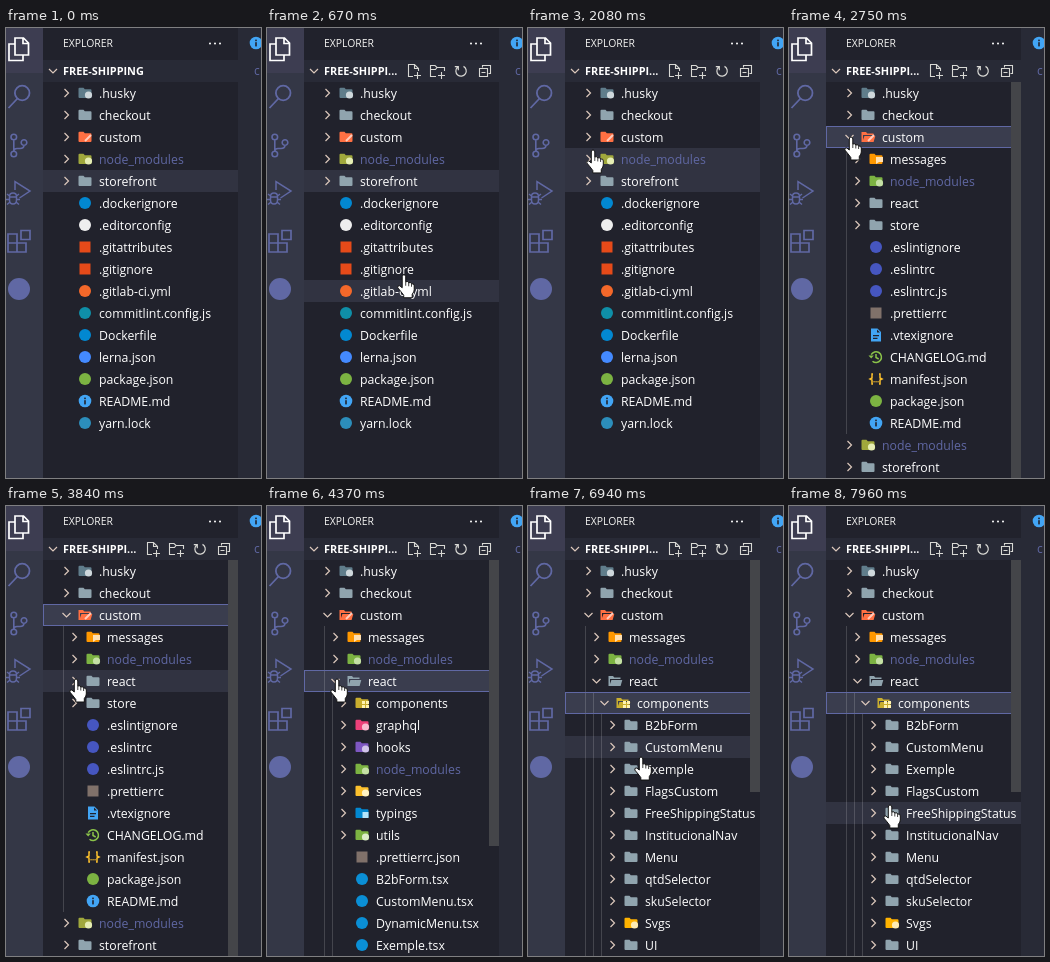
These frames come from a looping animation (255x450 px, 8000 ms). An HTML page with a canvas:

```html
<!DOCTYPE html>
<html lang="en">
<head>
<meta charset="utf-8">
<title>File explorer</title>
<style>
  html, body { margin: 0; width: 100%; height: 100%; overflow: hidden; background: #21222c; }
  canvas { display: block; }
</style>
</head>
<body>
<canvas id="stage" width="255" height="450"></canvas>
<script>
const ctx = document.getElementById('stage').getContext('2d');
const LOOP = 8000, ROW = 22, TOP = 54, LEFT = 37, RIGHT = 232;
const FONT = '"Open Sans", "Noto Sans", sans-serif';
const TEXT = '#ffffff', MUTED = '#6068a4', SIDE = '#21222c', PANEL = '#282a36', HOVER = '#313341';

// name: [shape, colour, badge colour, badge shape]
const ICONS = {
  folder: ['folder', '#90a4ae'],
  husky: ['folder', '#607d8b', '#cfd8dc', 'dot'],
  custom: ['folder', '#ff7043', '#ffccbc', 'pen'],
  rootModules: ['folder', '#a0a83c', '#e6eeb4', 'dot'],
  modules: ['folder', '#7cb342', '#c5e1a5', 'dot'],
  messages: ['folder', '#ff9800', '#ffe0b2', 'chat'],
  parts: ['folder', '#c9ae2e', '#fff3b0', 'grid'],
  graphql: ['folder', '#ec407a', '#f8bbd0', 'dot'],
  hooks: ['folder', '#7e57c2', '#d1c4e9', 'dot'],
  services: ['folder', '#fbc02d', '#fff3c4', 'dot'],
  typings: ['folder', '#0288d1', '#b3e5fc', 'box'],
  utils: ['folder', '#7cb342', '#dcedc8', 'dot'],
  svgs: ['folder', '#ffb300', '#ffecb3', 'dot'],
  docker: ['dot', '#0288d1'],
  editor: ['dot', '#eeeeee'],
  git: ['box', '#e64a19'],
  gitlab: ['dot', '#f4682a'],
  lint: ['dot', '#0f8fa8'],
  lerna: ['dot', '#448aff'],
  node: ['dot', '#7cb342'],
  yarn: ['dot', '#2c8ebb'],
  eslint: ['dot', '#4656c0'],
  prettier: ['box', '#80716a'],
  react: ['dot', '#0a8fd6'],
  info: ['info', '#42a5f5'],
  doc: ['doc', '#42a5f5'],
  clock: ['clock', '#8bc34a'],
  braces: ['braces', '#fbc02d']
};

const list = s => s.trim().split(/\s+/).map(item => item.split(':'));
const ROOT = list(`.husky:husky checkout:folder custom:custom node_modules:rootModules storefront:folder
  .dockerignore:docker .editorconfig:editor .gitattributes:git .gitignore:git .gitlab-ci.yml:gitlab
  commitlint.config.js:lint Dockerfile:docker lerna.json:lerna package.json:node README.md:info yarn.lock:yarn`);
const CHILDREN = {
  custom: list(`messages:messages node_modules:modules react:folder store:folder .eslintignore:eslint
    .eslintrc:eslint .eslintrc.js:eslint .prettierrc:prettier .vtexignore:doc CHANGELOG.md:clock
    manifest.json:braces package.json:node README.md:info`),
  react: list(`components:parts graphql:graphql hooks:hooks node_modules:modules services:services
    typings:typings utils:utils .prettierrc.json:prettier B2bForm.tsx:react CustomMenu.tsx:react
    DynamicMenu.tsx:react Exemple.tsx:react`),
  components: list(`B2bForm:folder CustomMenu:folder Exemple:folder FlagsCustom:folder
    FreeShippingStatus:folder InstitucionalNav:folder Menu:folder qtdSelector:folder
    skuSelector:folder Svgs:svgs UI:folder`)
};

// Each click selects a folder, then opens it one step later.
const CLICKS = [
  { name: 'custom', at: 2550, thumb: 483 },
  { name: 'react', at: 4170, thumb: 286 },
  { name: 'components', at: 5920, thumb: 232 }
];
const OPEN_DELAY = 70;

// Fingertip path: time, x, y
const PATH = [
  [260, 252, 436], [590, 144, 268], [670, 137, 247], [930, 114, 182], [1000, 112, 177], [1810, 71, 151],
  [1880, 69, 148], [2080, 65, 122], [2350, 62, 109], [3030, 62, 109], [3840, 70, 173],
  [4770, 70, 173], [5180, 74, 195], [5260, 74, 195], [5330, 75, 195], [5720, 76, 195],
  [6200, 76, 196], [6330, 79, 196], [6460, 79, 196], [6940, 113, 251], [7330, 112, 268],
  [7860, 102, 298], [7960, 101, 299]
];

function pointer(t) {
  if (t < PATH[0][0]) return null;
  const i = PATH.findIndex(p => p[0] > t);
  if (i < 0) return PATH[PATH.length - 1].slice(1);
  const [t0, x0, y0] = PATH[i - 1], [t1, x1, y1] = PATH[i];
  const k = (t - t0) / (t1 - t0);
  return [x0 + (x1 - x0) * k, y0 + (y1 - y0) * k];
}

function rect(x, y, w, h, color) {
  ctx.fillStyle = color;
  ctx.fillRect(x, y, w, h);
}

function disc(x, y, r, color) {
  ctx.fillStyle = color;
  ctx.beginPath();
  ctx.arc(x, y, r, 0, 7);
  ctx.fill();
}

function stroke(d, color, width = 1.2) {
  ctx.strokeStyle = color;
  ctx.lineWidth = width;
  ctx.stroke(new Path2D(d));
}

function fill(d, color) {
  ctx.fillStyle = color;
  ctx.fill(new Path2D(d));
}

function label(s, x, y, color, size = 12.3, weight = 400) {
  ctx.font = `${weight} ${size}px ${FONT}`;
  ctx.fillStyle = color;
  ctx.fillText(s, x, y);
}

function at(x, y, draw) {
  ctx.save();
  ctx.translate(x, y);
  draw();
  ctx.restore();
}

function chevron(x, y, open) {
  at(x, y, () => stroke(open ? 'M-4-2L0 2L4-2' : 'M-2-4L2 0L-2 4', '#dcc8bc'));
}

const SHAPES = {
  dot: c => disc(0, 0, 6, c),
  box: c => rect(-5.5, -5.5, 11, 11, c),
  info(c) {
    disc(0, 0, 6.3, c);
    rect(-.8, -3.4, 1.6, 1.6, SIDE);
    rect(-.8, -.8, 1.6, 4.2, SIDE);
  },
  doc(c) {
    fill('M-5-6.5H1.5L5-3V6.5H-5Z', c);
    fill('M1-5.5V-2.5H4ZM-3 0H3V1.2H-3ZM-3 2.8H1.5V4H-3Z', SIDE);
  },
  clock(c) {
    stroke('M-4.8-2.3A5.4 5.4 0 1 1-3.5 4.2M0-3V.5L2.7 2', c, 1.5);
    fill('M-7.5-1.5H-2.2L-4.8 1.6Z', c);
  },
  braces(c) {
    stroke('M-3-5H-4V-1L-6 0L-4 1V5H-3M3-5H4V-1L6 0L4 1V5H3', c, 1.5);
    [-2, 0, 2].forEach(x => rect(x - .5, 2, 1.1, 1.4, c));
  }
};

const BADGES = {
  dot: c => disc(3.5, 2, 3.6, c),
  box: c => rect(.5, -1, 6, 6, c),
  pen: c => stroke('M0 4L6-2', c, 2),
  chat: c => fill('M0-2H7V3H3L0 5Z', c),
  grid: c => fill('M0-2H3V1H0ZM4-2H7V1H4ZM0 2H3V5H0ZM4 2H7V5H4Z', c)
};

function icon(name, x, y, open) {
  const [shape, color, badgeColor, badge] = ICONS[name];
  at(x, y, () => {
    if (shape !== 'folder') return SHAPES[shape](color);
    if (open) fill('M-6.5-5H-2L-.7-3.6H5.5V-2H-5V3L-3.6-1H7.3L5.6 5H-6.5Z', color);
    else fill('M-5.5-5.2H-1.5L-.2-3.8H5.5Q6.5-3.8 6.5-2.8V4Q6.5 5 5.5 5H-5.5Q-6.5 5-6.5 4V-4.2Q-6.5-5.2-5.5-5.2Z', color);
    if (badge) BADGES[badge](badgeColor);
  });
}

function activityBar() {
  rect(0, 0, LEFT, 450, '#343746');
  rect(0, 0, LEFT, 45, '#3d3d51');
  stroke('M9 10H17.5L22.5 15V27H9ZM17 10V15.5H22.5M9 16H3V32.5H17V27', TEXT, 1.7);
  stroke('M23.5 65A7.3 7.3 0 1 1 8.9 65A7.3 7.3 0 1 1 23.5 65M11 71L2.5 80', MUTED, 1.8);
  stroke('M10.6 109A2.8 2.8 0 1 1 5 109A2.8 2.8 0 1 1 10.6 109M10.6 126A2.8 2.8 0 1 1 5 126A2.8 2.8 0 1 1 10.6 126' +
    'M20.8 114.5A2.8 2.8 0 1 1 15.2 114.5A2.8 2.8 0 1 1 20.8 114.5M7.8 112V123M18 117.3Q18 120.5 14 120.5H11Q8 120.5 7.8 123', MUTED, 1.6);
  stroke('M9 162V153.5L24 163L13.5 170M3.5 168.5Q3.5 165 7 165Q10.5 165 10.5 168.5V172Q10.5 176 7 176Q3.5 176 3.5 172Z' +
    'M3.5 169H10.5M1 166L3.5 168M13 166L10.5 168M0 171.5H3.5M10.5 171.5H14M1 176.5L4 174M13 176.5L10 174', MUTED, 1.5);
  stroke('M2 206H11V215H20V224H2ZM2 215H11V224M15 202.5H24V211.5H15Z', MUTED, 1.7);
  disc(13, 261, 11, MUTED);
}

function header(hovered) {
  rect(LEFT, 32, RIGHT - LEFT, ROW, PANEL);
  label('EXPLORER', 57, 19, '#f4f4f2', 10.4);
  [204, 209, 214].forEach(x => disc(x, 15.5, 1, TEXT));
  chevron(47, 43, true);
  label(hovered ? 'FREE-SHIPPI...' : 'FREE-SHIPPING', 57, 47, TEXT, 10.9, 700);
  if (!hovered) return;
  const c = '#d8d8d4';
  stroke('M146 48.5H141.5V36.5H147.5L151.5 40.5V43M147.5 36.5V40.5H151.5M150.5 44V51M147 47.5H154', c, 1.1);
  stroke('M169 48.5H163.5V37.5H168L170 39.5H177.5V43M163.5 41.5H168.5L170 39.5M174.5 44V51M171 47.5H178', c, 1.1);
  stroke('M190.5 39.2A5.2 5.2 0 1 0 196.5 38.4M187.8 38.7H191.3V42.2', c, 1.2);
  stroke('M215.5 39.5V37.5H223.5V45.5H221.5M212.5 40.5H220.5V48.5H212.5ZM214.5 44.5H218.5', c, 1.1);
}

function visibleRows(t) {
  const isOpen = name => CLICKS.some(c => c.name === name && t >= c.at + OPEN_DELAY);
  const rows = [];
  const add = (items, depth) => items.forEach(([name, iconName]) => {
    const open = depth < 3 && isOpen(name);
    rows.push({ name, iconName, depth, open });
    if (open) add(CHILDREN[name], depth + 1);
  });
  add(ROOT, 0);
  return rows;
}

function tree(t) {
  const click = CLICKS.filter(c => t >= c.at).pop();
  const selected = click ? click.name : 'storefront';
  const probe = pointer(t - 70);
  const hover = probe && probe[0] < RIGHT ? Math.floor((probe[1] - TOP) / ROW) : -1;
  const rows = visibleRows(t);

  rows.slice(0, 18).forEach((row, i) => {
    const y = TOP + i * ROW, mid = y + 11, shift = row.depth * 8;
    const isSelected = row.name === selected;
    if (isSelected && click) rect(LEFT, y, RIGHT - LEFT, ROW, '#3a3d4e');
    else if (isSelected || i === hover) rect(LEFT, y, RIGHT - LEFT, ROW, HOVER);
    for (let d = 0; d < row.depth; d++) rect(57 + d * 8, y, 1, ROW, 'rgba(255,255,255,.16)');
    if (isSelected && click) {
      ctx.strokeStyle = MUTED;
      ctx.lineWidth = 1;
      ctx.strokeRect(LEFT + .5, y + .5, RIGHT - LEFT - 1, ROW - 1);
    }
    if (ICONS[row.iconName][0] === 'folder') chevron(60.5 + shift, mid, row.open);
    icon(row.iconName, 79 + shift, mid, row.open);
    label(row.name, 93 + shift, mid + 4.5, row.name === 'node_modules' ? MUTED : TEXT);
  });

  const opened = CLICKS.filter(c => t >= c.at + OPEN_DELAY).pop();
  if (opened) {
    ctx.globalAlpha = Math.min(1, (t - CLICKS[0].at) / 200);
    rect(222, TOP, 10, opened.thumb, '#444549');
    ctx.globalAlpha = 1;
  }
}

function editorEdge() {
  rect(RIGHT, 0, 255 - RIGHT, 450, PANEL);
  icon('info', 250, 15);
  label('c', 248, 47, MUTED, 12);
}

function hand([x, y]) {
  at(x - 6.7, y, () => {
    const shape = 'M5 2Q5 0 6.7 0Q8.5 0 8.5 2V7Q11 6 11.5 8Q14 7 14.3 9Q17 8.5 17 11V15Q17 17 15 19.5V23H6.5V20.5Q4 17 .5 13Q0 10.5 2.5 11L5 13Z';
    fill(shape, '#fff');
    stroke(shape, '#111', 1);
    stroke('M8.5 7V11M11.5 8V11.5M14.3 9V12', '#111', .8);
  });
}

function render(t) {
  rect(0, 0, 255, 450, SIDE);
  const tip = pointer(t);
  tree(t);
  header(tip && t >= 330);
  activityBar();
  editorEdge();
  if (tip) hand(tip);
}

function loop() {
  render(performance.now() % LOOP);
  requestAnimationFrame(loop);
}
loop();
</script>
</body>
</html>
```
